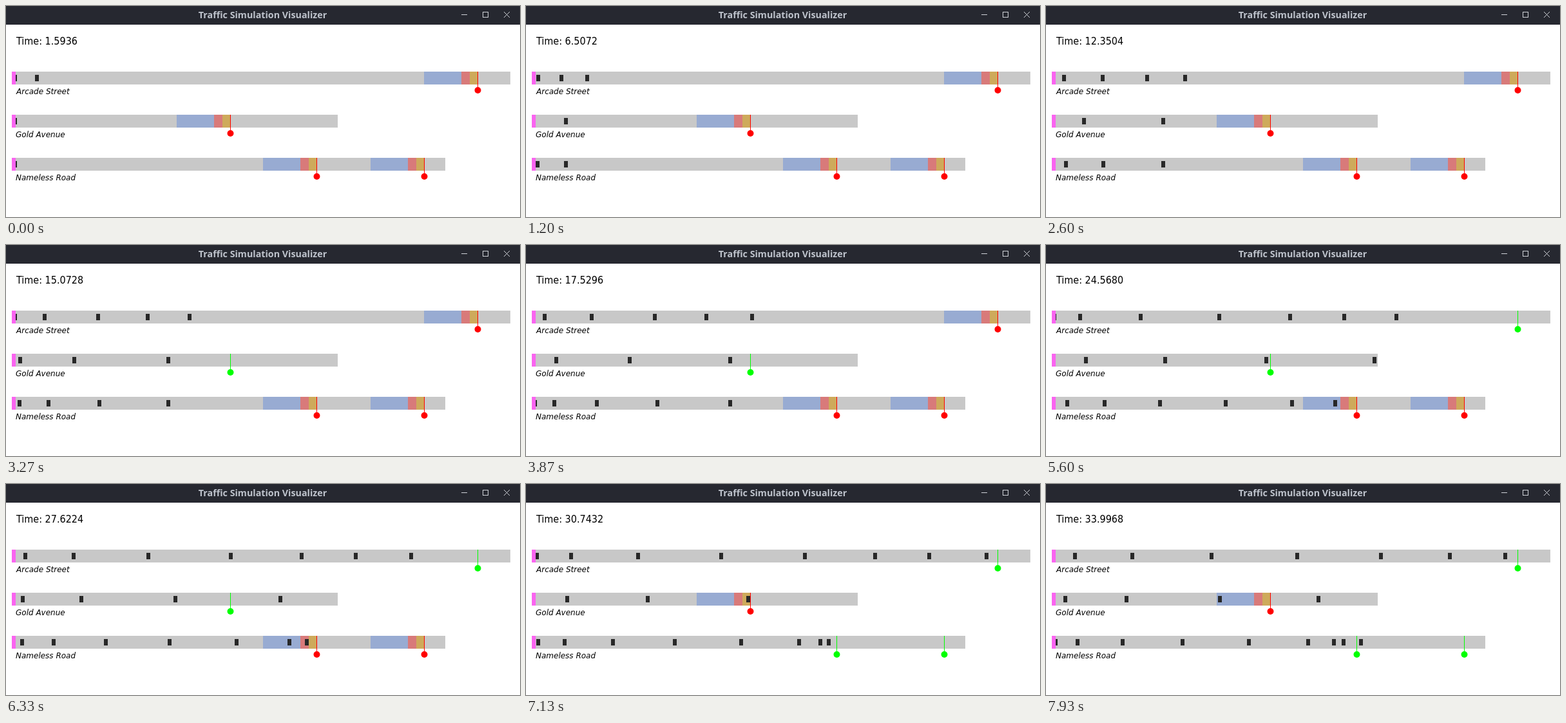
An HTML page with a canvas that plays this animation: 798x328 px, repeating every 8 s.

```html
<!DOCTYPE html>
<html lang="en">
<head>
<meta charset="utf-8">
<title>Traffic Simulation Visualizer</title>
<style>
  html, body { margin: 0; width: 100%; height: 100%; overflow: hidden; background: #fff; }
  canvas { display: block; }
</style>
</head>
<body>
<canvas id="stage" width="798" height="328"></canvas>
<script>
const ctx = document.getElementById('stage').getContext('2d');

const LOOP = 8000, FRAME = 200 / 3;
const DT = 0.0166, TICKS = 4;
const ORIGIN = 15, SCALE = 5 / 3;

// Car-following model, in metres and seconds
const CAR = { len: 4, gap: 4, headway: 1, vmax: 16.6, acc: 1.44, brake: 4.61 };
const SQRT_AB = 2 * Math.sqrt(CAR.acc * CAR.brake);
const SLOW_DIST = 50, STOP_DIST = 15, SLOW_FACTOR = 0.4;

const roads = [
  { name: 'Arcade Street', labelX: 16, y: 102, end: 783, length: 460, every: 5, period: 20,
    signals: [{ x: 430, px: 732 }], start: [20, 0] },
  { name: 'Gold Avenue', labelX: 15, y: 169, end: 515, length: 300, every: 6, period: 15,
    signals: [{ x: 200, px: 348 }], start: [] },
  { name: 'Nameless Road', labelX: 15, y: 236, end: 682, length: 400, every: 4, period: 30,
    signals: [{ x: 280, px: 482 }, { x: 380, px: 649 }], start: [] }
];

// [display frame, simulation step]
const pace = [[0, 24], [18, 98], [39, 186], [58, 264], [73, 323], [95, 416], [104, 451], [119, 512]];

const newCar = x => ({ x, v: 0, a: 0, vmax: CAR.vmax, stopped: false });

function release(car) {
  car.vmax = CAR.vmax;
  car.stopped = false;
}

function moveCar(car, lead) {
  if (car.v + car.a * DT < 0) {
    car.x -= car.v * car.v / car.a / 2;
    car.v = 0;
  } else {
    car.v += car.a * DT;
    car.x += car.v * DT + car.a * DT * DT / 2;
  }
  let alpha = 0;
  if (lead) {
    const space = lead.x - car.x - CAR.len;
    const wish = CAR.headway * car.v + (car.v - lead.v) * car.v / SQRT_AB;
    alpha = (CAR.gap + Math.max(0, wish)) / space;
  }
  car.a = car.stopped
    ? -CAR.brake * car.v / car.vmax
    : CAR.acc * (1 - (car.v / car.vmax) ** 4 - alpha ** 2);
}

const isGreen = (road, t) => Math.floor(t / road.period) % 2 === 1;

function obeySignals(road, t) {
  const { cars, signals } = road;
  if (isGreen(road, t)) {
    cars.forEach(release);
    return;
  }
  for (const car of cars) {
    if (signals.some(s => car.x > s.x && car.x < s.x + 2)) release(car);
  }
  for (const s of signals) {
    const first = cars.find(c => c.x <= s.x);
    if (!first) continue;
    const left = s.x - first.x;
    if (left <= SLOW_DIST && left > STOP_DIST) first.vmax = SLOW_FACTOR * CAR.vmax;
    else if (left <= STOP_DIST && left >= STOP_DIST / 2) first.stopped = true;
  }
}

function spawn(road, t) {
  if (t - road.last < road.every) return;
  const tail = road.cars[road.cars.length - 1];
  if (tail && tail.x <= CAR.gap + CAR.len) return;
  road.cars.push(newCar(0));
  road.last = t;
}

function tick(road, t) {
  road.cars.forEach((car, i) => moveCar(car, road.cars[i - 1]));
  obeySignals(road, t);
  if (road.cars.length && road.cars[0].x > road.length) road.cars.shift();
  spawn(road, t);
}

function simulate(steps) {
  for (const road of roads) {
    road.cars = road.start.map(newCar);
    road.last = -Infinity;
  }
  const history = [];
  for (let n = 0; n <= steps; n++) {
    const now = n * TICKS * DT;
    history.push(roads.map(r => ({ xs: r.cars.map(c => c.x), green: isGreen(r, now) })));
    for (let k = 0; k < TICKS; k++) {
      for (const road of roads) tick(road, now + k * DT);
    }
  }
  return history;
}

const history = simulate(512);

function frameAt(t) {
  let i = Math.floor(t / FRAME) + 1;
  while (Math.round(i * FRAME / 10) * 10 > t) i--;
  return i === 74 ? 73 : Math.min(i, 119); // one held frame
}

function stepAt(frame) {
  let k = 0;
  while (k < pace.length - 2 && frame >= pace[k + 1][0]) k++;
  const [f0, n0] = pace[k], [f1, n1] = pace[k + 1];
  return Math.round(n0 + (n1 - n0) * (frame - f0) / (f1 - f0));
}

function rect(color, x, y, w, h) {
  ctx.fillStyle = color;
  ctx.fillRect(x, y, w, h);
}

function text(str, x, y, font, color) {
  ctx.font = font;
  ctx.fillStyle = color;
  ctx.fillText(str, x, y);
}

function drawHeader() {
  rect('#262830', 0, 0, 798, 29);
  ctx.textAlign = 'center';
  text('Traffic Simulation Visualizer', 398.5, 19, 'bold 14.3px "Open Sans", sans-serif', '#bec3cc');
  ctx.textAlign = 'left';
  rect('#d0d3d8', 707, 13, 9, 1);
  ctx.strokeStyle = '#d0d3d8';
  ctx.lineWidth = 1;
  ctx.strokeRect(740.5, 9.5, 8, 8);
  ctx.beginPath();
  ctx.moveTo(773, 9);
  ctx.lineTo(782, 18);
  ctx.moveTo(782, 9);
  ctx.lineTo(773, 18);
  ctx.stroke();
}

function drawZones(px, y) {
  rect('#98abd2', px - 83, y, 58, 20);
  rect('#d87a7a', px - 25, y, 13, 20);
  rect('#ceaa5b', px - 12, y, 12, 20);
}

function drawSignal(px, y, color) {
  rect(color, px, y, 1, 29);
  ctx.beginPath();
  ctx.arc(px + 0.5, y + 29, 5, 0, Math.PI * 2);
  ctx.fill();
}

function drawRoad(road, state) {
  const { y, signals } = road;
  rect('#c8c8c8', 9, y, road.end - 9, 20);
  if (!state.green) signals.forEach(s => drawZones(s.px, y));
  for (const x of state.xs) {
    rect('#282828', Math.floor(ORIGIN + x * SCALE) - 6, y + 5, 6, 10);
  }
  rect('#fa64f0', 9, y, 6, 20);
  signals.forEach(s => drawSignal(s.px, y, state.green ? '#00ff00' : '#ff0000'));
  text(road.name, road.labelX, y + 35, 'italic 12px "DejaVu Sans", sans-serif', '#000');
}

function draw(t) {
  const n = stepAt(frameAt(t));
  rect('#fff', 0, 0, 798, 328);
  drawHeader();
  text('Time: ' + (n * TICKS * DT).toFixed(4), 16, 60,
    '16px "DejaVu Sans Condensed", "Noto Sans", sans-serif', '#000');
  roads.forEach((road, i) => drawRoad(road, history[n][i]));
}

const begin = performance.now();

function loop() {
  draw((performance.now() - begin) % LOOP);
  requestAnimationFrame(loop);
}

loop();
</script>
</body>
</html>
```
